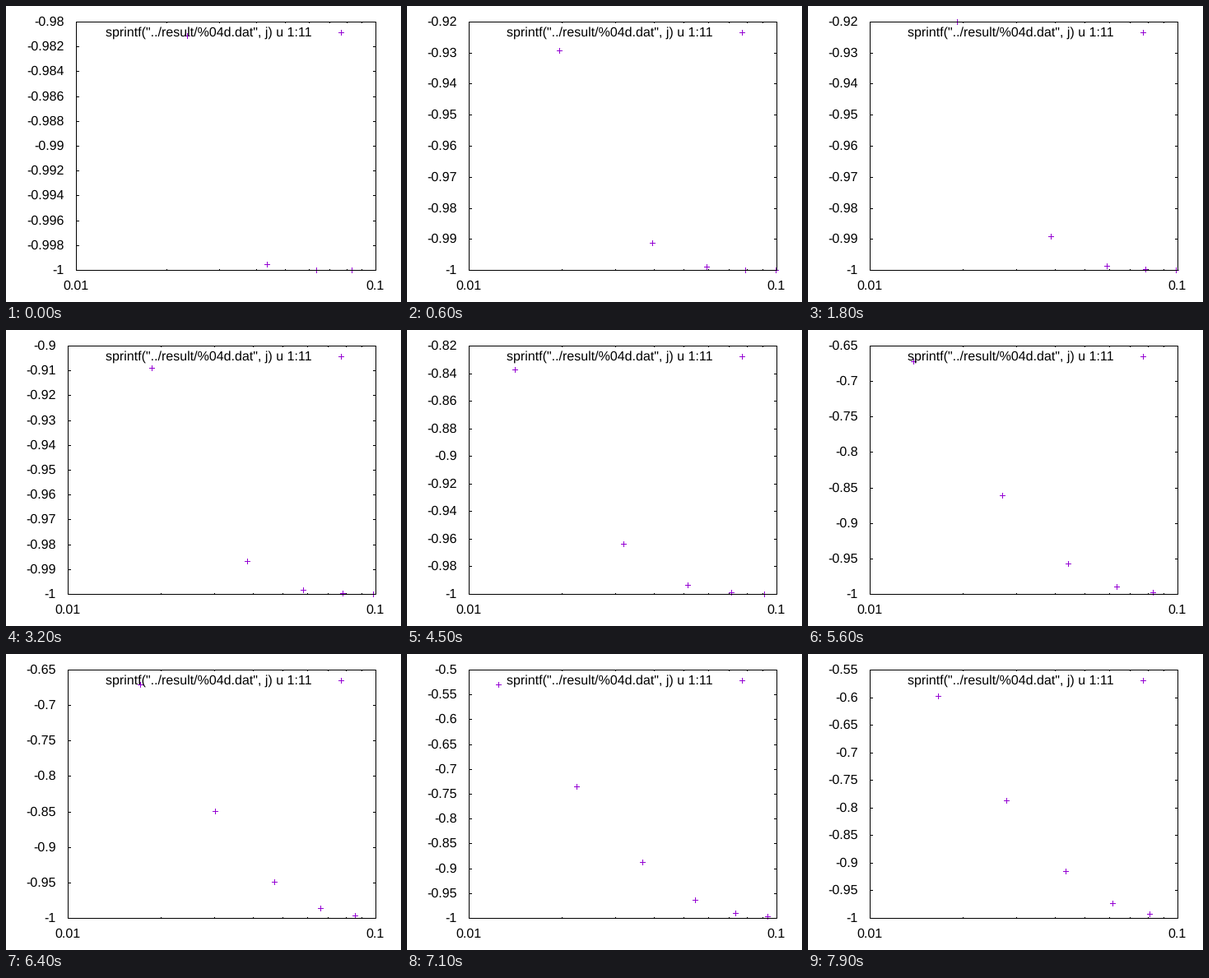
Write a matplotlib script that moves like this. It is 480 px wide and 360 px high and loops after 8000 ms.

```python
import numpy as np
import matplotlib.pyplot as plt
from matplotlib.animation import FuncAnimation
from matplotlib.collections import LineCollection

W, H, DPI = 480, 360, 100
PX = 72 / DPI
TOP, BOTTOM, RIGHT = 19, 321, 449
FRAMES, STEP_MS = 80, 100
PURPLE = "#9400d3"
TITLE = 'sprintf("../result/%04d.dat", j) u 1:11'

plt.rcParams["font.family"] = "Liberation Sans"
plt.rcParams["text.hinting"] = "none"

# Evenly spaced particles drift left and pile up where the field is high.
# Key points of the drift (1e-2 units) over time, and of the field's offset,
# decay rate and packing strength over the drift.
TIME = np.array([0, 0.6, 3.2, 4.5, 5.6, 6.4, 7.9])
DRIFT = np.array([-.335, .065, .183, .87, 3.68, 5.43, 7.92])
OFFSET = [-.308, .642, .627, .655, .240, .113, -.006]
DECAY = [1.803, 1.001, .931, .807, .6175, .5656, .5336]
PACKING = [1, .5, .5, 1.25, 1.57, 1.57, 1.59]
CURVE = .009
GRID = np.linspace(.2, 30, 3000)

# Monotone cubic: harmonic mean of neighbouring slopes at each key point.
SLOPE = np.diff(DRIFT) / np.diff(TIME)
inner = 2 * SLOPE[:-1] * SLOPE[1:] / (SLOPE[:-1] + SLOPE[1:])
SPEED = np.r_[1.5 * SLOPE[0] - .5 * inner[0], inner,
              1.5 * SLOPE[-1] - .5 * inner[-1]]


def drift_at(t):
    k = min(np.searchsorted(TIME, t + 1e-9, side="right") - 1, len(SLOPE) - 1)
    span = TIME[k + 1] - TIME[k]
    u = (t - TIME[k]) / span
    return (DRIFT[k] * (1 + 2 * u) * (1 - u) ** 2
            + DRIFT[k + 1] * u * u * (3 - 2 * u)
            + span * u * (1 - u) * (SPEED[k] * (1 - u) - SPEED[k + 1] * u))


def particles(t):
    """Visible positions (1e-2) and heights above -1 at time t."""
    drift = drift_at(t)
    offset, decay, packing = (np.interp(drift, DRIFT, key)
                              for key in (OFFSET, DECAY, PACKING))

    def field(x):
        return np.exp(-(offset + decay * x + CURVE * x * x))

    q = field(GRID)
    rest = GRID - packing * (q + q * q) / (decay + 2 * CURVE * GRID)
    x = np.interp(2 * np.arange(13) - drift, rest, GRID)
    x = x[(x >= 1) & (x <= 10)]
    return x, field(x)


def tic_step(span):
    power = 10.0 ** np.floor(np.log10(span))
    norm = span / power
    return power * (0.2 if norm < 2 else 0.5 if norm < 5 else 1)


def hline(x0, x1, y):
    return [(x0, y + .5), (x1 + 1, y + .5)]


def vline(x, y0, y1):
    return [(x + .5, y0), (x + .5, y1 + 1)]


def cross(x, y):
    return [hline(x - 3, x + 3, y), vline(x, y - 3, y + 3)]


fig = plt.figure(figsize=(W / DPI, H / DPI), dpi=DPI, facecolor="white")
ax = fig.add_axes([0, 0, 1, 1])


def strokes(lines, color, z):
    ax.add_collection(LineCollection(lines, colors=color, linewidths=PX,
                                     capstyle="butt", snap=False, zorder=z),
                      autolim=False)


def label(x, y, s, ha):
    ax.text(x, y + 5, s, ha=ha, va="baseline", fontsize=16 * PX, color="black")


def draw(i):
    ax.clear()
    ax.set(xlim=(0, W), ylim=(H, 0))
    ax.axis("off")

    x, value = particles(i * STEP_MS / 1000)
    step = tic_step(value.max())
    n = int(np.ceil(value.max() / step - 1e-9))
    names = [f"{round(-1 + j * step, 6):g}" for j in range(n + 1)]
    left = 25 + 10 * max(map(len, names))

    def col(v):
        return int(round(left + (RIGHT - left) * np.log10(v)))

    def row(v):
        return int(round(BOTTOM - (BOTTOM - TOP) * v / (n * step)))

    frame = [hline(left, RIGHT, TOP), hline(left, RIGHT, BOTTOM),
             vline(left, TOP, BOTTOM), vline(RIGHT, TOP, BOTTOM)]
    for j, name in enumerate(names):
        y = row(j * step)
        frame += [hline(left, left + 3, y), hline(RIGHT - 3, RIGHT, y)]
        label(left - 14, y, name, "right")
    for m in range(2, 10):
        c = col(m)
        frame += [vline(c, BOTTOM - 1, BOTTOM), vline(c, TOP, TOP + 1)]
    label(left - .5, 340, "0.01", "center")
    label(RIGHT - .5, 340, "0.1", "center")
    label(120.6, 32, TITLE, "left")

    marks = cross(407, 32)
    for px, v in zip(x, value):
        marks += cross(col(px), row(v))
    strokes(marks, PURPLE, 2)
    strokes(frame, "black", 2.5)
    return []


anim = FuncAnimation(fig, draw, frames=FRAMES, interval=STEP_MS,
                     init_func=lambda: [], repeat=True, repeat_delay=0,
                     blit=False)
plt.show()
```
